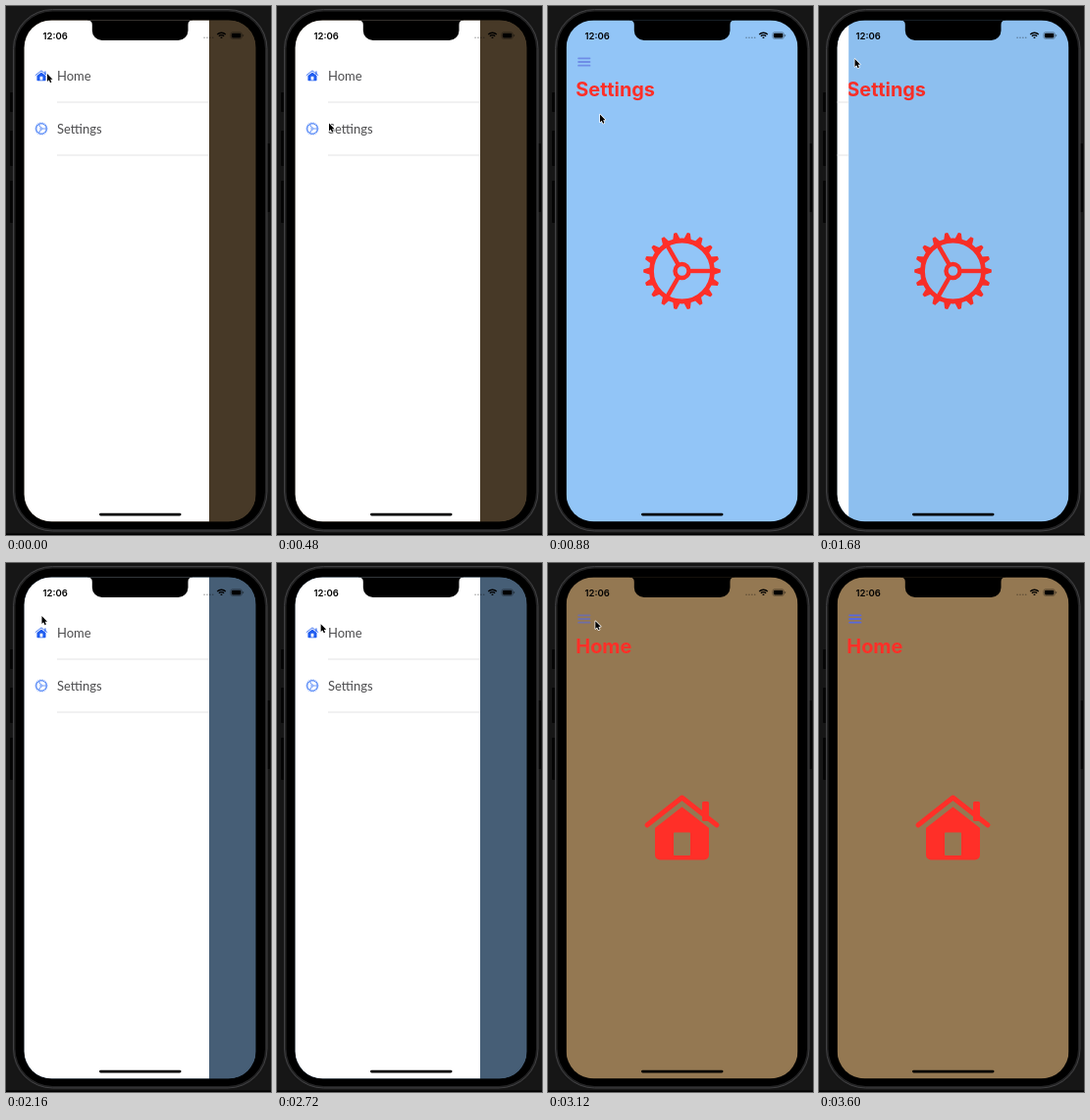
Recreate the animation shown at these times as an HTML page with a canvas. Size 270 by 539 pixels, loop 3920 ms.

```html
<!DOCTYPE html>
<html lang="en">
<head>
<meta charset="utf-8">
<title>Side menu</title>
<style>
  html, body { margin: 0; width: 100%; height: 100%; overflow: hidden; background: #161616; }
  canvas { display: block; width: 270px; height: 539px; }
</style>
</head>
<body>
<canvas id="stage"></canvas>
<script>
const W = 270, H = 539, LOOP = 3920, STEP = 80;
const SCREEN = { x: 18.6, y: 14.4, w: 235.9, h: 511, r: 28 };
const MENU_W = 188, MENU_RIGHT = 207, SLIDE = 350;
const RED = '#ff2f28';
const PAGES = {
  Home: { bg: '#947852', icon: house },
  Settings: { bg: '#92c5f7', icon: gear }
};

// Pointer path: time, x, y
const POINTER = [
  [0, 42, 69], [80, 42, 69], [480, 53, 119.5], [720, 53, 119.5],
  [880, 53, 110.5], [1440, 36.5, 54], [2560, 36.5, 54],
  [2800, 47.5, 65], [3040, 47.5, 65], [3520, 58, -14]
];

const canvas = document.getElementById('stage');
const ctx = canvas.getContext('2d');
const dpr = window.devicePixelRatio || 1;
canvas.width = W * dpr;
canvas.height = H * dpr;

const clamp = v => Math.max(0, Math.min(1, v));
const ease = v => { const k = clamp(v); return k * k * (3 - 2 * k); };

function box(x, y, w, h, r, fill) {
  ctx.beginPath();
  ctx.roundRect(x, y, w, h, r);
  if (fill) {
    ctx.fillStyle = fill;
    ctx.fill();
  }
}

function poly(points) {
  ctx.beginPath();
  points.forEach(([x, y], i) => i ? ctx.lineTo(x, y) : ctx.moveTo(x, y));
}

function text(str, x, y, font, color) {
  ctx.font = font;
  ctx.fillStyle = color;
  ctx.fillText(str, x, y);
}

function at(x, y, scale, draw) {
  ctx.save();
  ctx.translate(x, y);
  ctx.scale(scale, scale);
  draw();
  ctx.restore();
}

function house(color) {
  ctx.fillStyle = ctx.strokeStyle = color;
  ctx.lineCap = ctx.lineJoin = 'round';
  ctx.lineWidth = 5;
  poly([[-35.5, -3], [0, -31], [35.5, -3]]);
  ctx.stroke();
  box(20.5, -27, 7, 20, 1.5, color);
  ctx.beginPath();
  ctx.moveTo(0, -21.5);
  ctx.lineTo(27.5, 0);
  ctx.arcTo(27.5, 32.5, 20, 32.5, 5);
  ctx.arcTo(-27.5, 32.5, -27.5, 20, 5);
  ctx.lineTo(-27.5, 0);
  ctx.closePath();
  ctx.roundRect(-8.5, 4.5, 17, 23.5, 1);
  ctx.fill('evenodd');
}

function gear(color) {
  const teeth = 18;
  ctx.fillStyle = ctx.strokeStyle = color;
  ctx.lineCap = 'butt';
  ctx.lineJoin = 'round';
  const ring = (r, w) => {
    ctx.beginPath();
    ctx.arc(0, 0, r, 0, Math.PI * 2);
    ctx.lineWidth = w;
    ctx.stroke();
  };
  ring(31, 4.8);
  ring(7, 4.4);
  for (let i = 0; i < 3; i++) {
    ctx.save();
    ctx.rotate(i * Math.PI * 2 / 3);
    ctx.fillRect(8, -2.2, 21.5, 4.4);
    ctx.restore();
  }
  ctx.lineWidth = 1.6;
  for (let i = 0; i < teeth; i++) {
    ctx.save();
    ctx.rotate(i * Math.PI * 2 / teeth);
    poly([[32, -3], [38.5, -1], [38.5, 1], [32, 3]]);
    ctx.closePath();
    ctx.fill();
    ctx.stroke();
    ctx.restore();
  }
}

function drawPhone() {
  ctx.fillStyle = '#161616';
  ctx.fillRect(0, 0, W, H);
  [[88, 20], [127, 36], [178, 43]].forEach(([y, h]) => box(4, y, 4, h, 1, '#050505'));
  box(265, 140, 4, 70, 1, '#050505');
  box(7.5, 3.5, 258.5, 531.5, 40, '#242425');
  ctx.strokeStyle = '#404042';
  ctx.lineWidth = 1;
  ctx.stroke();
  box(9.5, 5.5, 254.5, 527.5, 38, '#000');
  ctx.fillStyle = '#000';
  ctx.fillRect(0, 537.5, W, 1.5);
}

function drawPage(name, burger) {
  const page = PAGES[name];
  ctx.fillStyle = page.bg;
  ctx.fillRect(SCREEN.x, SCREEN.y, SCREEN.w, SCREEN.h);
  text(name, 28.3, 92, '700 19.9px Inter, sans-serif', RED);
  at(136.5, 270, 1, () => page.icon(RED));
  ctx.globalAlpha = burger;
  [53.3, 57, 60.7].forEach(y => box(30.2, y - 0.9, 13.2, 1.8, 0.9, '#5868dc'));
  ctx.globalAlpha = 1;
}

function drawMenu(open, picked) {
  ctx.fillStyle = `rgba(0,0,0,${0.52 * open})`;
  ctx.fillRect(SCREEN.x, SCREEN.y, SCREEN.w, SCREEN.h);
  if (open < 0.003) return;
  ctx.save();
  ctx.translate(MENU_W * (open - 1), 0);
  ctx.fillStyle = '#fff';
  ctx.fillRect(0, SCREEN.y, MENU_RIGHT, SCREEN.h);
  Object.keys(PAGES).forEach((name, i) => {
    const y = 71 + i * 54;
    ctx.fillStyle = '#e4e4e6';
    ctx.fillRect(52, y + 26.5, 155, 1);
    if (name === picked) {
      ctx.fillStyle = '#c8c7ce';
      ctx.fillRect(0, y - 27, MENU_RIGHT, 54);
    }
    at(36, y, 0.165, () => PAGES[name].icon(i ? '#3f78f5' : '#1f5cf0'));
    text(name, 52, y + 4.5, '13px Lato, sans-serif', '#4c4c4e');
  });
  ctx.restore();
}

function drawStatus() {
  text('12:06', 37.5, 33.7, '600 9.5px Inter, sans-serif', '#000');
  for (let i = 0; i < 4; i++) box(201.3 + i * 2.9, 31.4, 1.5, 1.5, 0.75, 'rgba(0,0,0,.4)');

  ctx.strokeStyle = '#000';
  ctx.lineCap = 'butt';
  ctx.lineWidth = 1.4;
  [6, 3.7, 1.2].forEach(r => {
    ctx.beginPath();
    ctx.arc(219.5, 33.3, r, -Math.PI * 0.75, -Math.PI * 0.25);
    ctx.stroke();
  });

  box(228.8, 26.8, 11.6, 6.6, 2);
  ctx.strokeStyle = 'rgba(0,0,0,.45)';
  ctx.lineWidth = 0.7;
  ctx.stroke();
  box(229.8, 27.8, 9.6, 4.6, 1.1, '#000');
  box(241.2, 29, 0.9, 2.2, 0.4, 'rgba(0,0,0,.5)');

  box(95, 516.7, 83.5, 2.8, 1.4, '#000');

  // Notch with flared shoulders
  const top = SCREEN.y;
  ctx.fillStyle = '#000';
  ctx.beginPath();
  ctx.moveTo(83, top - 1);
  ctx.lineTo(83, top);
  ctx.quadraticCurveTo(87.8, top, 87.8, top + 4.5);
  ctx.lineTo(87.8, 25);
  ctx.arcTo(87.8, 35, 97.8, 35, 10);
  ctx.lineTo(175.5, 35);
  ctx.arcTo(185.5, 35, 185.5, 25, 10);
  ctx.lineTo(185.5, top + 4.5);
  ctx.quadraticCurveTo(185.5, top, 190, top);
  ctx.lineTo(190, top - 1);
  ctx.fill();
}

function drawPointer(t) {
  const i = POINTER.findIndex(p => p[0] > t);
  if (i < 0) return;
  const [t0, x0, y0] = POINTER[i - 1], [t1, x1, y1] = POINTER[i];
  const k = ease((t - t0) / (t1 - t0));
  at(x0 + (x1 - x0) * k, y0 + (y1 - y0) * k, 0.88, () => {
    poly([[0, 0], [0, 9], [2, 7.2], [3.5, 10.4], [5, 9.7], [3.6, 6.6], [6.3, 6.4]]);
    ctx.closePath();
    ctx.lineJoin = 'round';
    ctx.lineWidth = 1.6;
    ctx.strokeStyle = '#fff';
    ctx.stroke();
    ctx.fillStyle = '#000';
    ctx.fill();
  });
}

function openness(t) {
  const slide = start => ease((t - start) / SLIDE);
  return 1 - slide(537) + slide(1628) - slide(2777);
}

function burgerAlpha(t) {
  const fade = (start, len) => clamp((t - start) / len);
  return fade(790, 150) - fade(1610, 60) + fade(3030, 150);
}

function draw(t) {
  ctx.setTransform(dpr, 0, 0, dpr, 0, 0);
  drawPhone();
  ctx.save();
  box(SCREEN.x, SCREEN.y, SCREEN.w, SCREEN.h, SCREEN.r);
  ctx.clip();
  drawPage(t >= 880 && t < 3120 ? 'Settings' : 'Home', burgerAlpha(t));
  const picked = t >= 540 && t < 960 ? 'Settings' : t >= 2780 ? 'Home' : '';
  drawMenu(openness(t), picked);
  drawStatus();
  ctx.restore();
  drawPointer(t);
}

const begin = performance.now();
function tick() {
  const t = (performance.now() - begin) % LOOP;
  draw(Math.floor(t / STEP) * STEP);
  requestAnimationFrame(tick);
}
tick();
</script>
</body>
</html>
```
